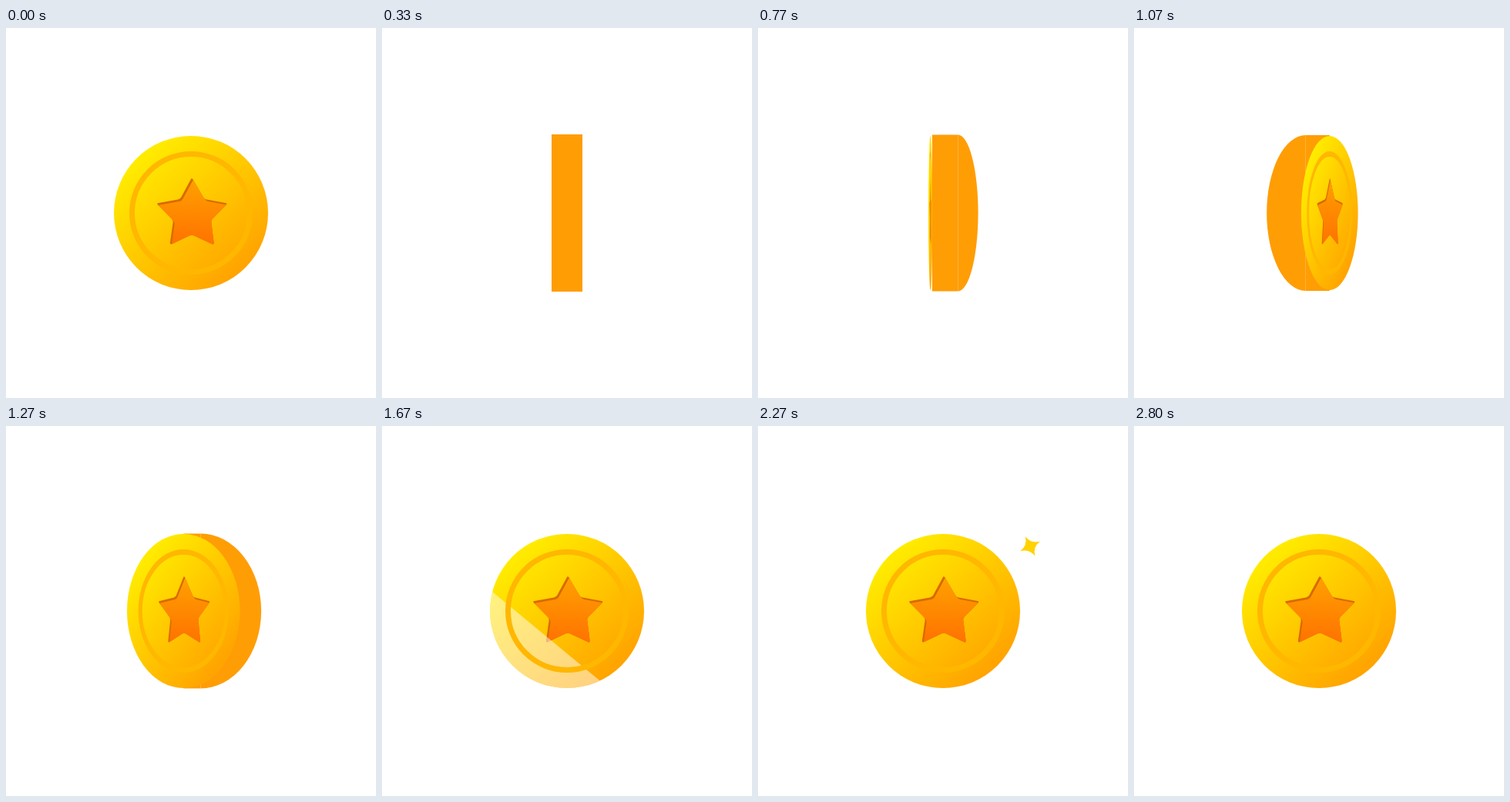
These frames come from a looping animation (480 px wide and 480 px high, 3.01 s). An HTML page with a canvas:

```html
<!DOCTYPE html>
<html lang="en">
<head>
<meta charset="utf-8">
<title>Spinning coin</title>
<style>
  html, body { margin: 0; width: 100%; height: 100%; overflow: hidden; background: #fff; }
  canvas { display: block; width: 480px; height: 480px; }
</style>
</head>
<body>
<canvas id="stage" width="480" height="480"></canvas>
<script>
const ctx = document.getElementById('stage').getContext('2d');
const LOOP = 3010, MID = 240, TAU = Math.PI * 2;
const EDGE = '#ff9d05';

function gradient(x0, y0, x1, y1, from, to) {
  const g = ctx.createLinearGradient(x0, y0, x1, y1);
  g.addColorStop(0, from);
  g.addColorStop(1, to);
  return g;
}

// Face coordinates are relative to the coin's centre.
const faceFill = gradient(-64, -72, 64, 72, '#ffeb00', '#ffa400');
const starFill = gradient(0, -45, 0, 42, '#ffa000', '#ff7000');

const starPoints = [[1, -46], [17.5, -18], [47.5, -12.5], [26, 9.5], [30, 41.5],
  [1, 28], [-27.5, 41.5], [-23, 9.5], [-45, -12.5], [-14, -18]];

// Closed outline whose corners are slightly rounded.
const star = new Path2D();
starPoints.forEach((p, i) => {
  const n = starPoints.length;
  const toward = q => {
    const dx = q[0] - p[0], dy = q[1] - p[1], k = 3 / Math.hypot(dx, dy);
    return [p[0] + dx * k, p[1] + dy * k];
  };
  const a = toward(starPoints[(i + n - 1) % n]);
  const b = toward(starPoints[(i + 1) % n]);
  i ? star.lineTo(...a) : star.moveTo(...a);
  star.quadraticCurveTo(...p, ...b);
});
star.closePath();

function disc(r) {
  ctx.beginPath();
  ctx.arc(0, 0, r, 0, TAU);
}

// Coin angle in degrees: ease in, steady spin, ease out.
function spin(f) {
  if (f <= 10) return 90 * Math.pow(f / 10, 5 / 3);
  if (f <= 34) return 90 + 15 * (f - 10);
  return 540 - 90 * Math.pow(Math.max(0, 44 - f) / 10, 5 / 3);
}

function drawShine(f) {
  if (f <= 48 || f >= 60) return;
  const lead = 28.75 * (f - 48);
  ctx.save();
  disc(100);
  ctx.clip();
  ctx.rotate(Math.atan2(115, 139));
  ctx.fillStyle = 'rgba(255,255,255,.5)';
  ctx.fillRect(-150, 100 - lead, 300, 140);
  ctx.restore();
}

function drawFace(f) {
  disc(100);
  ctx.fillStyle = faceFill;
  ctx.fill();

  ctx.fillStyle = '#d96a00';
  ctx.fill(star);
  ctx.save();
  ctx.clip(star);
  ctx.translate(2, 2.5);
  ctx.fillStyle = starFill;
  ctx.fill(star);
  ctx.restore();

  drawShine(f);

  disc(76.5);
  ctx.lineWidth = 7;
  ctx.strokeStyle = '#ffb700';
  ctx.stroke();
}

function drawCoin(f) {
  const deg = spin(f), a = deg * Math.PI / 180;
  const open = Math.abs(Math.cos(a)), depth = Math.abs(Math.sin(a));
  const side = deg % 180 < 90 ? 1 : -1;
  const face = Math.pow(Math.max(0, (open - .245) / .755), .92);
  const shift = 16.5 * Math.pow(1 - face, .4);

  if (deg % 180) {
    const ry = 102 - 2 * open, rx = ry * open;
    let back = 20 * depth;
    if (f > 36) back = Math.min(back, 100 - rx);
    const front = open < .01 ? 20 : Math.min(shift, Math.max(14, 20 - 24 * open));
    const x0 = MID + side * front, x1 = MID - side * back;
    ctx.fillStyle = EDGE;
    ctx.fillRect(Math.min(x0, x1), MID - ry, Math.abs(x1 - x0), 2 * ry);
    ctx.beginPath();
    // Only the half facing away from the front.
    ctx.ellipse(x1, MID, rx, ry, 0, Math.PI / 2, -Math.PI / 2, side < 0);
    ctx.fill();
  }
  if (face > 0) {
    ctx.save();
    ctx.translate(MID + side * shift, MID);
    ctx.scale(face, 1);
    drawFace(f);
    ctx.restore();
  }
}

// A glint pops out over 7 frames, turning, and collapses over 4.
function drawGlint(x, y, size, f) {
  if (f <= 0 || f >= 11) return;
  const grow = f < 7 ? 1 - Math.pow(1 - f / 7, 4) : 1 - Math.pow((f - 7) / 4, 1.5);
  ctx.save();
  ctx.translate(x, y);
  ctx.rotate(f * 10.6 * Math.PI / 180);
  ctx.scale(size * grow, size * grow);
  ctx.beginPath();
  ctx.moveTo(0, -1);
  for (const [cx, cy, px, py] of [[1, -1, 1, 0], [1, 1, 0, 1], [-1, 1, -1, 0], [-1, -1, 0, -1]])
    ctx.quadraticCurveTo(cx * .16, cy * .16, px, py);
  ctx.fillStyle = '#ffd200';
  ctx.fill();
  ctx.restore();
}

function render(ms) {
  const f = Math.floor((ms % LOOP + 4) * .03);
  ctx.fillStyle = '#fff';
  ctx.fillRect(0, 0, 480, 480);
  drawCoin(f);
  drawGlint(353, 156, 14.3, f - 62);
  drawGlint(120, 285.5, 10.9, f - 73);
}

const start = performance.now();
function tick() {
  render(performance.now() - start);
  requestAnimationFrame(tick);
}
tick();
</script>
</body>
</html>
```
